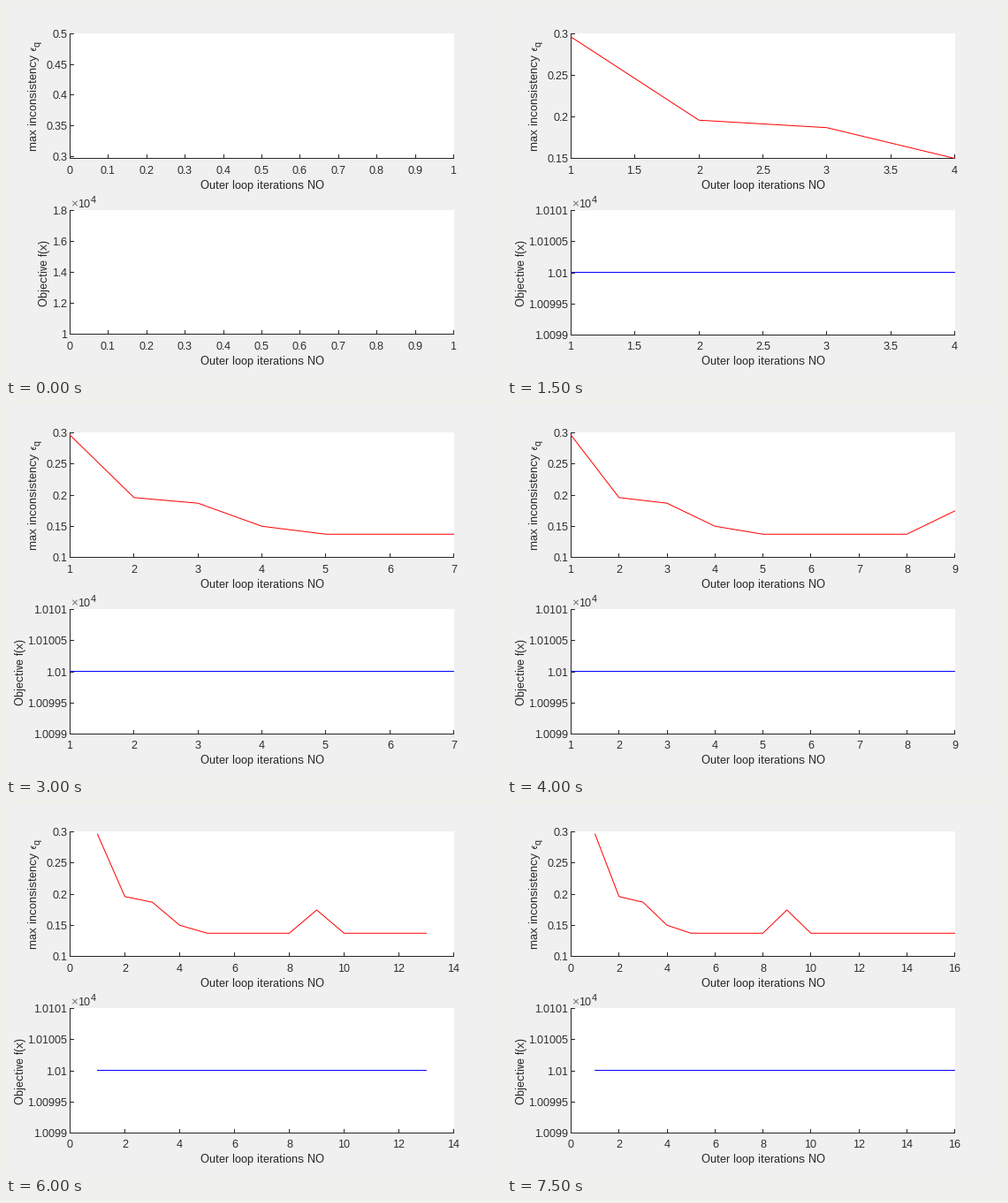
Write a matplotlib script that moves like this. It is 560 px wide and 420 px high and loops after 8 s.

```python
import numpy as np
import matplotlib.pyplot as plt
from matplotlib.animation import FuncAnimation
from matplotlib.patches import Rectangle

W, H, DPI = 560, 420, 100
PX = 72 / DPI
LEFT, RIGHT = 72.5, 506.5
INK = "#262626"
STEPS = 16

# Whole-pixel glyph advances without kerning, as on-screen GUI text has.
plt.rcParams.update({
    "font.family": "Liberation Sans",
    "text.hinting": "default",
    "text.hinting_factor": 1,
    "text.kerning_factor": 16,
})

# Inconsistency settles at BASE apart from one bump at iteration 9.
BASE = 0.1372
gap = np.full(STEPS, BASE)
gap[:4] = 0.2962, 0.196, 0.187, 0.15
gap[8] = 0.1745
cost = np.full(STEPS, 1.01)

fig = plt.figure(figsize=(W / DPI, H / DPI), dpi=DPI, facecolor="#f0f0f0")
ax = fig.add_axes([0, 0, 1, 1])


def stroke(x, y, color=INK, z=3):
    ax.plot(x, y, color=color, lw=PX, zorder=z, snap=False)


def label(x, y, s, px=12, ha="left", rot=0, color=INK, **kw):
    ax.text(x, y, s, fontsize=px * PX, ha=ha, va="baseline", rotation=rot,
            rotation_mode="anchor", color=color, **kw)


def crisp(v):
    return np.floor(v + 1e-6) + 0.5


def ticks(lo, hi, step):
    first = int(np.ceil(lo / step - 1e-6))
    last = int(np.floor(hi / step + 1e-6))
    return [i * step for i in range(first, last + 1)]


def x_axis(n):
    if n == 1:
        return 0, 1, 0.1
    if n < 12:
        step = {2: 0.1, 3: 0.2}.get(n, 0.5 if n < 7 else 1)
        return 1, n, step
    if n == 15:
        return 0, 15, 5
    return 0, n + n % 2, 2


def gap_axis(n):
    if n == 1:
        return 0.2965, 0.5, 0.05
    lo = {2: 0.19, 3: 0.18, 4: 0.15}.get(n, 0.1)
    return lo, 0.3, 0.05


def cost_axis(n):
    return (1, 1.8, 0.2) if n == 1 else (1.0099, 1.0101, 0.00005)


def panel(top, bottom, xa, ya, data, color, tick_base, name_base):
    def sx(v):
        return LEFT + (v - xa[0]) / (xa[1] - xa[0]) * (RIGHT - LEFT)

    def sy(v):
        return bottom - (v - ya[0]) / (ya[1] - ya[0]) * (bottom - top)

    ax.add_patch(Rectangle((LEFT - 0.5, top - 0.5), RIGHT - LEFT + 1,
                           bottom - top + 1, fc="white", lw=0, zorder=1))
    stroke([LEFT, LEFT], [top, bottom])
    stroke([LEFT, RIGHT], [bottom, bottom])
    for v in ticks(*xa):
        x = crisp(sx(v))
        stroke([x, x], [bottom - 4, bottom])
        label(x, tick_base, f"{v:g}", ha="center")
    for v in ticks(*ya):
        y = crisp(sy(v))
        stroke([LEFT, LEFT + 4], [y, y])
        label(69.5, y + 4.5, f"{v:g}", ha="right")
    label((LEFT + RIGHT) / 2, name_base, "Outer loop iterations NO", 13,
          "center")
    if len(data) > 1:
        y = sy(data)
        if np.ptp(y) == 0:
            y = crisp(y - 0.5)
        stroke(sx(np.arange(1, len(data) + 1)), y, color, 4)


def draw(k):
    n = k + 1
    ax.clear()
    ax.set(xlim=(0, W), ylim=(H, 0))
    ax.axis("off")
    xa = x_axis(n)

    panel(31.5, 172.5, xa, gap_axis(n), gap[:n], "red", 190, 207)
    label(35, 164, "max inconsistency", 13, rot=90)
    label(35, 52.5, r"$\epsilon$", 13, rot=90, math_fontfamily="cm")
    label(39, 46.5, "q", 11, rot=90)

    panel(231.5, 371.5 if n == 1 else 372.5, xa, cost_axis(n), cost[:n],
          "blue", 389, 406)
    label(47 if n == 1 else 20, 340, "Objective f(x)", 13, rot=90)
    label(73, 228, "×", 14, color="#707070")
    label(82, 228, "10")
    label(96, 223, "4", 11)
    return []


anim = FuncAnimation(fig, draw, frames=STEPS, init_func=lambda: draw(0),
                     interval=500, repeat=True, repeat_delay=0, blit=False)
plt.show()
```
